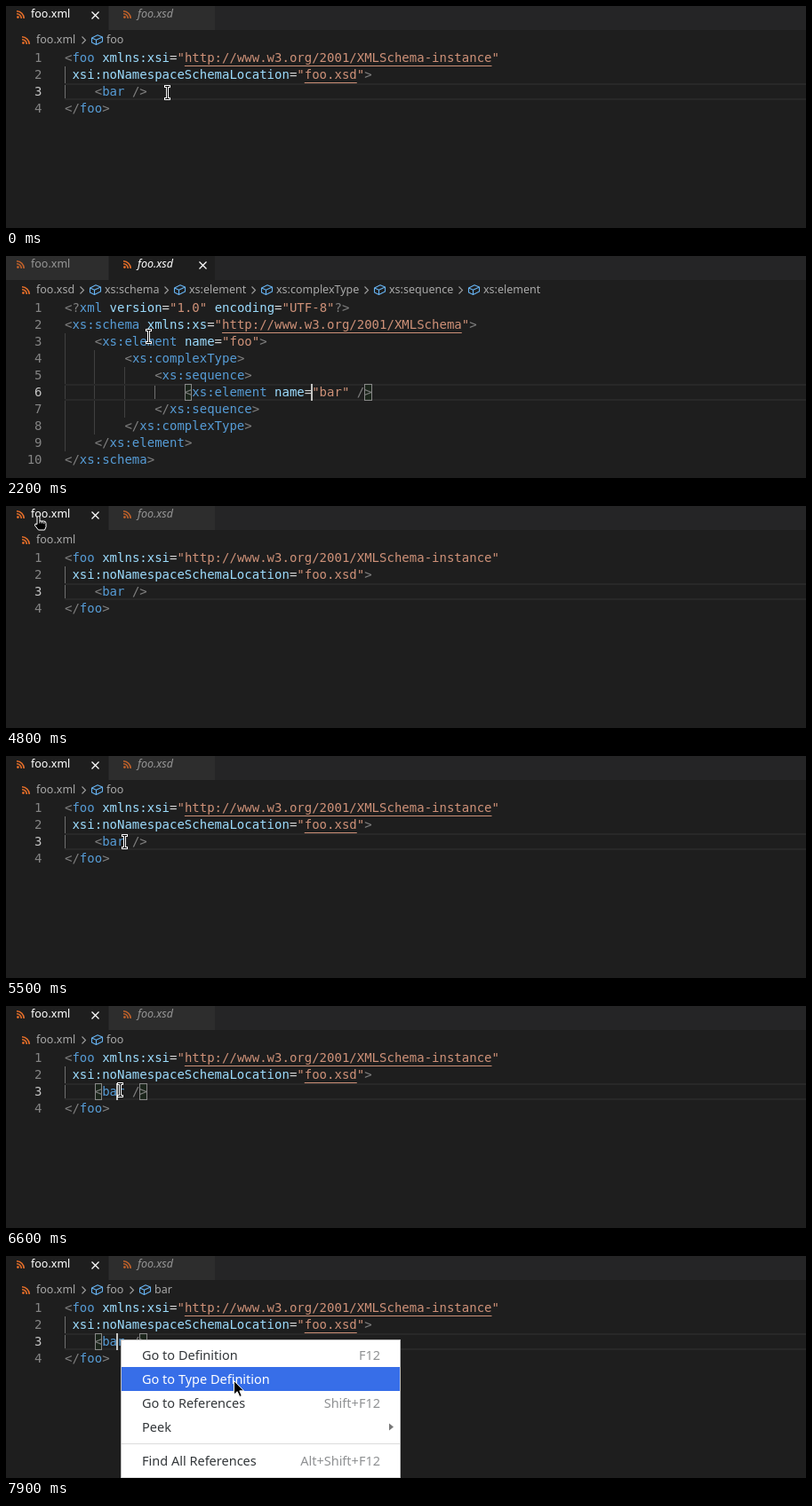
Animation, 900 px wide and 250 px high, one loop 8 s. Source, as an HTML page:

```html
<!DOCTYPE html>
<html lang="en">
<head>
<meta charset="utf-8">
<title>Go to Type Definition</title>
<style>
html, body { margin: 0; width: 100%; height: 100%; overflow: hidden; background: #1e1e1e; }
#stage { position: absolute; left: 0; top: 0; width: 900px; height: 250px; overflow: hidden; font: 12.5px/22px "Noto Sans", sans-serif; }
#stage div, #stage svg, .crumb b { position: absolute; }
svg { overflow: visible; fill: none; }
[hidden] { display: none !important; }

#bar { width: 900px; height: 27px; background: #252526; }
.tab { top: 0; height: 27px; background: #2d2d2d; color: #969696; }
.tab.on { background: #1e1e1e; color: #fff; }
.tab span { position: absolute; top: -2px; }
.tab .feed { top: 5px; opacity: .8; }
.tab.on .feed { opacity: 1; }
.tab .close { top: 6px; stroke: currentColor; stroke-width: 1.2; visibility: hidden; }
.tab.on .close, .tab.hover .close { visibility: visible; }
#tabXsd { font-style: italic; }

.crumb { top: 27px; color: #a9a9a9; white-space: pre; }
.crumb.hover { color: #e0e0e0; }
.cube { left: -17px; top: 5px; stroke: #66b2f0; stroke-width: 1.1; stroke-linejoin: round; }
.chevron { left: -28px; top: 7px; stroke: #a0a0a0; stroke-width: 1.1; }

.pane { left: 0; top: 49px; width: 900px; font: 14px/19px "DejaVu Sans Mono", monospace; color: #d4d4d4; white-space: pre; }
.line { left: 66px; }
.num { left: 0; width: 40.5px; text-align: right; color: #858585; }
.num.on { color: #c6c6c6; }
.guide { width: 1px; background: #404040; }
.guide.on { background: #707070; }
.current { left: 66px; width: 834px; height: 19px; box-sizing: border-box; border: solid #282828; border-width: 2px 0; }
.match { width: 8.43px; height: 19px; box-sizing: border-box; border: 1px solid #888; background: rgba(0, 100, 0, .1); }
.caret { width: 2px; height: 19px; background: #c4c5c3; }
.punct { color: #808080; }
.tag { color: #569cd6; }
.attr { color: #9cdcfe; }
.str { color: #ce9178; }
.linked .link { text-decoration: underline; text-underline-position: under; text-decoration-skip-ink: none; }

#menu { left: 129px; top: 94px; width: 313px; height: 170px; border: 1px solid #bdbdbd; background: #fff; font: 14.5px/27px "Noto Sans", sans-serif; color: #33373a; }
.item { left: 0; width: 313px; height: 27px; }
.item span { position: absolute; left: 23px; white-space: pre; }
.item .key { left: auto; right: 22px; color: #8f9193; }
.item.on, .item.on .key { background: #376ee8; color: #fff; }
.rule { left: 0; width: 313px; height: 1px; background: #dcdcdc; }
.more { left: 301px; top: 9px; fill: #777; }
#pointer g { stroke: #fff; fill: #000; }
</style>
</head>
<body>
<div id="stage">
  <div id="bar"></div>
  <div id="tabXml" class="tab" style="left:0;width:115px"></div>
  <div id="tabXsd" class="tab" style="left:116px;width:119px"></div>
  <div id="menu"></div>
  <svg id="pointer" width="1" height="1">
    <g id="beam"><path d="M-2-7H2M0-7V7M-2 7H2" stroke-width="3" stroke-linecap="square"/><path d="M-2-7H2M0-7V7M-2 7H2" stroke="#000" stroke-linecap="square"/></g>
    <g id="hand"><path d="M-1.5 1.5A1.5 1.5 0 0 1 1.5 1.5V5.5H6A2.5 2.5 0 0 1 8.5 8V12L7 15.5H0L-4 10.5-3.5 8.5-1.5 9Z"/><path d="M1.5 5V8M4 5.5V8M6.3 6V8.5"/></g>
    <g id="arrow"><path d="M0 0V15.5L3.7 12.2 6.3 18 8.8 17 6.3 11.3H11Z"/></g>
  </svg>
</div>
<script>
const $ = id => document.getElementById(id);
const stage = $('stage'), menu = $('menu'), pointer = $('pointer');
const CHAR = 8.428, LINE = 19, LEFT = 66;

function add(parent, cls, html = '', style = {}) {
  const el = document.createElement('div');
  el.className = cls;
  el.innerHTML = html;
  for (const k in style) el.style[k] = style[k] + (typeof style[k] === 'number' ? 'px' : '');
  parent.append(el);
  return el;
}

const svg = (cls, w, h, body, style = '') =>
  `<svg class="${cls}" width="${w}" height="${h}" style="${style}">${body}</svg>`;
const feed = x => svg('feed', 9, 9,
  '<circle cx="1.4" cy="7.6" r="1.4" fill="#e8702a"/><path d="M0 3.7A5.3 5.3 0 0 1 5.3 9M0 .8A8.2 8.2 0 0 1 8.2 9" stroke="#e8702a" stroke-width="1.6"/>',
  `left:${x}px`);
const cube = svg('cube', 13, 12, '<path d="M.5 4 7 .8 12.5 3V8L5.5 11.5.5 9ZL5.5 6.3 12.5 3M5.5 6.3V11.5"/>');
const chevron = svg('chevron', 5, 9, '<path d="M.5.5 4.5 4.5.5 8.5"/>');

function fillTab(tab, name, closeX) {
  tab.innerHTML = feed(11.5 + (tab === $('tabXsd') ? 4 : 0)) +
    `<span style="left:${tab === $('tabXsd') ? 32 : 28}px">${name}</span>` +
    svg('close', 9, 9, '<path d="M.5.5 8.5 8.5M8.5.5.5 8.5"/>', `left:${closeX}px`);
}
fillTab($('tabXml'), 'foo.xml', 96);
fillTab($('tabXsd'), 'foo.xsd', 101);

function makeCrumbs(file, items) {
  const root = add(stage, 'crumbs');
  add(root, 'crumb', feed(-16).replace('style="', 'style="top:7px;') + file, { left: 34 });
  const parts = items.map(([text, x]) => add(root, 'crumb', chevron + cube + text, { left: x }));
  return { root, parts };
}
const xmlCrumbs = makeCrumbs('foo.xml', [['foo', 113], ['bar', 167]]);
const xsdCrumbs = makeCrumbs('foo.xsd', [['xs:schema', 111], ['xs:element', 206],
  ['xs:complexType', 304], ['xs:sequence', 431], ['xs:element', 537]]);

const esc = s => s.replace(/</g, '&lt;').replace(/>/g, '&gt;');
function colour(line) {
  let inTag = false;
  return line.replace(/<[?/]?|[?/]?>|"[^"]*"|[\w:]+|[= ]/g, tok => {
    const wrap = (cls, s) => `<span class="${cls}">${s}</span>`;
    if (/[<>]/.test(tok)) { inTag = tok[0] === '<'; return wrap('punct', esc(tok)); }
    if (tok[0] === '"') {
      const body = tok.slice(1, -1);
      return wrap('str', '"' + (/http|xsd/.test(body) ? wrap('link', body) : body) + '"');
    }
    if (tok === '=' || tok === ' ') return tok;
    const cls = inTag ? 'tag' : 'attr';
    inTag = false;
    return wrap(cls, tok);
  });
}

// guides: [column, first line, line count, active]; lines count from 0
function makePane(text, current, guides, matches) {
  const root = add(stage, 'pane');
  for (const [col, row, n, on] of guides)
    add(root, on ? 'guide on' : 'guide', '', { left: Math.floor(LEFT + col * CHAR), top: row * LINE, height: n * LINE });
  add(root, 'current', '', { top: current * LINE });
  const boxes = matches.map(col => add(root, 'match', '', { left: LEFT + col * CHAR, top: current * LINE }));
  text.split('\n').forEach((line, i) => {
    add(root, i === current ? 'num on' : 'num', i + 1, { top: i * LINE });
    add(root, 'line', colour(line), { top: i * LINE });
  });
  return { root, boxes, caret: add(root, 'caret', '', { top: current * LINE }) };
}

const xml = makePane(`<foo xmlns:xsi="http://www.w3.org/2001/XMLSchema-instance"
 xsi:noNamespaceSchemaLocation="foo.xsd">
    <bar />
</foo>`, 2, [[0, 1, 2, true]], [4, 10]);

const xsd = makePane(`<?xml version="1.0" encoding="UTF-8"?>
<xs:schema xmlns:xs="http://www.w3.org/2001/XMLSchema">
    <xs:element name="foo">
        <xs:complexType>
            <xs:sequence>
                <xs:element name="bar" />
            </xs:sequence>
        </xs:complexType>
    </xs:element>
</xs:schema>`, 5, [[0, 2, 7], [4, 3, 5], [8, 4, 3], [12, 5, 1, true]], [16, 40]);
xsd.caret.style.left = '343px';

const items = [['Go to Definition', 'F12', 3], ['Go to Type Definition', '', 30],
  ['Go to References', 'Shift+F12', 57], ['Peek', '', 84], ['Find All References', 'Alt+Shift+F12', 122]]
  .map(([name, key, top]) => add(menu, 'item', `<span>${name}</span><span class="key">${key}</span>`, { top }));
items[3].innerHTML += svg('more', 5, 9, '<path d="M0 .5 5 4.5 0 8.5Z"/>');
for (const top of [116, 154]) add(menu, 'rule', '', { top });
stage.append(menu, pointer);

// time, x, y
const path = [
  [0, 181, 97], [100, 181, 97], [400, 180, 98], [1200, 180, 98], [1600, 159, 12],
  [2000, 159, 12], [2200, 160, 90], [2400, 275, 178], [2600, 275, 178], [3300, 437, 151],
  [3900, 437, 151], [4000, 406, 143], [4200, 126, 36], [4300, 126, 36], [4600, 33, 11],
  [4700, 33, 11], [4800, 36, 11], [4900, 36, 11], [5600, 150, 111], [6300, 128, 94],
  [6900, 128, 94], [7000, 148, 98], [7100, 167, 100], [7800, 248, 136], [7900, 256, 140]
];
function pointerAt(t) {
  const i = path.findIndex(p => p[0] >= t);
  if (i < 1) return path[0].slice(1);
  const [t0, x0, y0] = path[i - 1], [t1, x1, y1] = path[i], k = (t - t0) / (t1 - t0);
  return [x0 + (x1 - x0) * k, y0 + (y1 - y0) * k];
}

const caretOn = [[300, 800], [1300, 2400], [2900, 3500], [4000, 4500], [4900, 5300], [5800, 6300], [6600, 7200], [7700, 8000]];
const show = (el, on) => { el.hidden = !on; };

function draw(now) {
  const t = Math.floor(now % 8000 / 100) * 100;
  const schema = t >= 1900 && t < 4800, clicked = t >= 6600;
  const [x, y] = pointerAt(t);

  $('tabXml').className = 'tab' + (schema ? '' : ' on') + (y < 27 && x < 115 ? ' hover' : '');
  $('tabXsd').className = 'tab' + (schema ? ' on' : '') + (y < 27 && x > 115 && x < 235 ? ' hover' : '');

  for (const el of [xml.root, xmlCrumbs.root]) show(el, !schema);
  for (const el of [xsd.root, xsdCrumbs.root]) show(el, schema);
  show(xmlCrumbs.parts[0], t < 4800 || t >= 5000);
  show(xmlCrumbs.parts[1], t >= 6800);
  xsdCrumbs.parts.forEach(el => show(el, t >= 2100));
  xsdCrumbs.parts[0].classList.toggle('hover', y > 30 && y < 48 && x > 94 && x < 172);
  xml.root.classList.toggle('linked', t < 4800 || t >= 5000);
  xsd.root.classList.toggle('linked', t >= 2100);

  xml.boxes.forEach(el => show(el, clicked));
  xml.caret.style.left = (clicked ? 124 : 166) + 'px';
  const lit = caretOn.some(([a, b]) => t >= a && t < b);
  show(xml.caret, lit);
  show(xsd.caret, lit);

  show(menu, t >= 6700);
  items[0].classList.toggle('on', t >= 7000 && t < 7900);
  items[1].classList.toggle('on', t >= 7900);

  const kind = t >= 7000 ? 'arrow' : y < 48 ? 'hand' : 'beam';
  for (const id of ['beam', 'hand', 'arrow']) $(id).style.display = id === kind ? '' : 'none';
  pointer.style.transform = `translate(${Math.floor(x) + .5}px, ${Math.floor(y) + .5}px)`;
}

const start = performance.now();
function tick() {
  draw(performance.now() - start);
  requestAnimationFrame(tick);
}
tick();
</script>
</body>
</html>
```
